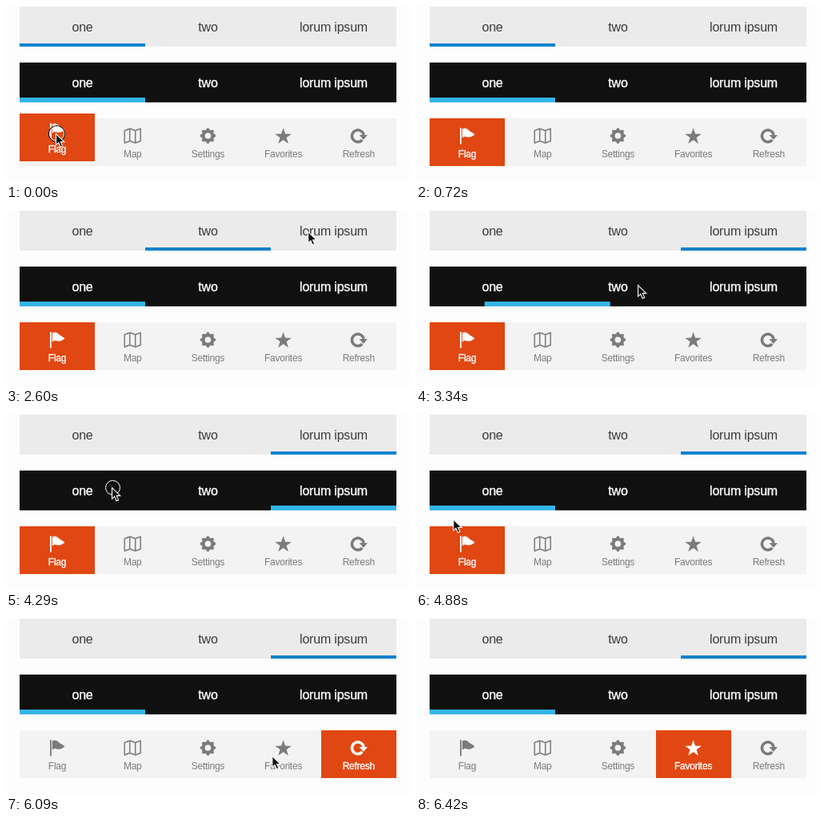
Animation of 505 by 221 pixels, one loop 7.49 s. Source, as an HTML page:

```html
<!DOCTYPE html>
<html lang="en">
<head>
<meta charset="utf-8">
<title>Animated tab bars</title>
<style>
  html, body { margin: 0; width: 100%; height: 100%; overflow: hidden; background: #fdfdfd; }
  svg { display: block; width: 505px; height: 221px; font-family: "Liberation Sans", Arial, sans-serif; }
  text { text-anchor: middle; }
  .tab { font-size: 16px; letter-spacing: -.2px; fill: #3a3a3a; }
  .dark { fill: #fff; stroke: #fff; stroke-width: .35; }
  .item { --ink: #7b7b7b; --bg: none; }
  .item.on { --ink: #fff; --bg: #e14712; }
  .item rect { fill: var(--bg); }
  .item text { font-size: 12px; letter-spacing: -.25px; fill: var(--ink); }
  .item.on text { stroke: #fff; stroke-width: .35; }
  .fill { fill: var(--ink); }
  .line { fill: none; stroke: var(--ink); }
</style>
</head>
<body>
<svg viewBox="0 0 505 221">
  <rect x="17" y="1" width="471" height="50" fill="#ebebeb"/>
  <rect id="light" x="17" y="47" width="157" height="4" fill="#0e83cd"/>
  <rect x="17" y="71" width="471" height="50" fill="#101010"/>
  <rect id="dark" x="17" y="115" width="157" height="6" fill="#33b5e5"/>
  <rect x="17" y="141" width="471" height="60" fill="#f3f3f3"/>
  <g id="tabs"></g>
  <g id="items"></g>
  <g id="mouse">
    <g id="ring" fill="none">
      <circle cx="1.5" cy=".5" r="10" stroke="#111" stroke-width="1.2"/>
      <circle cx="1.5" cy=".5" r="9" stroke="#fff"/>
    </g>
    <path d="M.5.5V14.5L3.7 11.6L6 17L8.6 15.9L6.3 10.6H10.8Z" fill="#111" stroke="#fff" stroke-width="1.1"/>
  </g>
</svg>
<script>
const LOOP = 7490, SLIDE = 300, BOUNCE = 130, HOLD = 75;
const $ = id => document.getElementById(id);

// Closed outline through n points whose radius depends on the index
const radial = (n, cy, radius, turn) => "M" + Array.from({ length: n }, (_, i) => {
  const a = (i + turn) / n * 2 * Math.PI - Math.PI / 2, r = radius(i);
  return (r * Math.cos(a)).toFixed(2) + " " + (cy + r * Math.sin(a)).toFixed(2);
}).join("L") + "Z";

const star = radial(10, 1, i => i % 2 ? 4.2 : 10.8, 0);
const gear = radial(32, 0, i => i % 4 < 2 ? 9.8 : 7.9, -.5) + "M3.8 0A3.8 3.8 0 1 0-3.8 0A3.8 3.8 0 1 0 3.8 0Z";

// Icons are centred on their own origin
const icons = {
  Flag: `<path class="fill" d="M-9-10h1.8v20.5h-1.8ZM-6.2-8.5C-3-10.5 0-9 2-7C4-5 6-5 9.5-1.5C6 1 3 2.5 0 1.5C-2.5 .5-4.5 1-6.2 2.5Z"/>`,
  Map: `<path class="line" stroke-width="1.5" stroke-linejoin="round" d="M-10-6.5L-3.5-9L3.5-6.5L10-9V6.5L3.5 9L-3.5 6.5L-10 9ZM-3.5-9V6.5M3.5-6.5V9"/>`,
  Settings: `<path class="fill" fill-rule="evenodd" d="${gear}"/>`,
  Favorites: `<path class="fill" d="${star}"/>`,
  Refresh: `<path class="line" stroke-width="3.5" d="M4.5 5.3A7.4 7.4 0 1 1 6.3-1.2"/><path class="fill" d="M.8-1H11.2L6 5Z"/>`
};

["one", "two", "lorum ipsum"].forEach((name, i) => {
  const x = 95.5 + 157 * i;
  $("tabs").innerHTML += `<text class="tab" x="${x}" y="32">${name}</text>
    <text class="tab dark" x="${x}" y="102">${name}</text>`;
});

$("items").innerHTML = Object.entries(icons).map(([name, icon], i) => {
  const left = Math.round(17 + 94.2 * i), right = Math.round(17 + 94.2 * (i + 1));
  const mid = 64 + 94.2 * i;
  return `<g class="item"><rect x="${left}" y="141" width="${right - left}" height="60"/>
    <g transform="translate(${mid} 163)">${icon}</g><text x="${mid}" y="190">${name}</text></g>`;
}).join("");
const items = [...$("items").children];

// The pointer's stops; those with a part are clicks on its entry `to`.
// A bend is the control point of the way there.
const stops = [
  { at: -70, x: 62, y: 160, part: "items", to: 0 },
  { at: 630, x: 62, y: 160 },
  { at: 680, x: 70, y: 202 },
  { at: 1860, x: 190, y: 219 },
  { at: 2240, x: 252, y: 17, part: "light", to: 1 },
  { at: 2690, x: 378, y: 27, part: "light", to: 2 },
  { at: 3262, x: 277, y: 94, part: "dark", to: 1 },
  { at: 3740, x: 388, y: 94, part: "dark", to: 2 },
  { at: 4360, x: 132, y: 92, part: "dark", to: 0, bend: [690, 100] },
  { at: 5164, x: 158, y: 181, part: "items", to: 1, bend: [-145, 60] },
  { at: 5590, x: 440, y: 166, part: "items", to: 4, bend: [230, 235] },
  { at: 6180, x: 332, y: 173, part: "items", to: 3 },
  { at: 6420, x: 348, y: 221 }
];
const clicksOn = part => stops.filter(s => s.part === part);
const held = stop => stop.part ? HOLD : 0;
const clamp = p => Math.min(1, Math.max(0, p));
const smooth = p => p * p * (3 - 2 * p);
const bezier = (u, a, b, c) => (1 - u) ** 2 * a + 2 * u * (1 - u) * b + u * u * c;

// CSS "ease": cubic-bezier(.25, .1, .25, 1)
function ease(p) {
  const curve = (u, a, b) => 3 * u * (1 - u) ** 2 * a + 3 * u * u * (1 - u) * b + u ** 3;
  let lo = 0, hi = 1;
  for (let i = 0; i < 20; i++) {
    const u = (lo + hi) / 2;
    if (curve(u, .25, .25) < p) lo = u; else hi = u;
  }
  return curve(lo, .1, 1);
}

function slide(part, t) {
  let pos = 0;
  for (const { at, to } of clicksOn(part)) pos += (to - pos) * ease(clamp((t - at) / SLIDE));
  $(part).setAttribute("x", 17 + 157 * pos);
}

function pointer(t) {
  const i = stops.findIndex(s => s.at > t && s.at - held(s) > t);
  const to = stops[i], from = stops[i - 1];
  const start = from.at + held(from), end = to.at - held(to);
  const u = smooth(clamp((t - start) / (end - start)));
  const [bx, by] = to.bend || [(from.x + to.x) / 2, (from.y + to.y) / 2];
  return [bezier(u, from.x, bx, to.x), bezier(u, from.y, by, to.y)];
}

function draw(t) {
  slide("light", t);
  slide("dark", t);

  const last = clicksOn("items").filter(c => c.at <= t).pop();
  const lift = Math.round(6 * Math.sin(Math.PI * clamp((t - last.at) / BOUNCE)));
  items.forEach((item, i) => {
    const on = i === last.to;
    item.classList.toggle("on", on);
    item.setAttribute("transform", `translate(0 ${on ? -lift : 0})`);
  });

  const shown = t < 720 || t >= 1860 && t < 6420;
  $("mouse").style.display = shown ? "" : "none";
  if (shown) {
    $("mouse").setAttribute("transform", `translate(${pointer(t)})`);
    const down = stops.some(s => Math.abs(t - s.at) < held(s));
    $("ring").style.display = down ? "" : "none";
  }
}

const begin = performance.now();
function tick() {
  draw((performance.now() - begin) % LOOP);
  requestAnimationFrame(tick);
}
tick();
</script>
</body>
</html>
```
